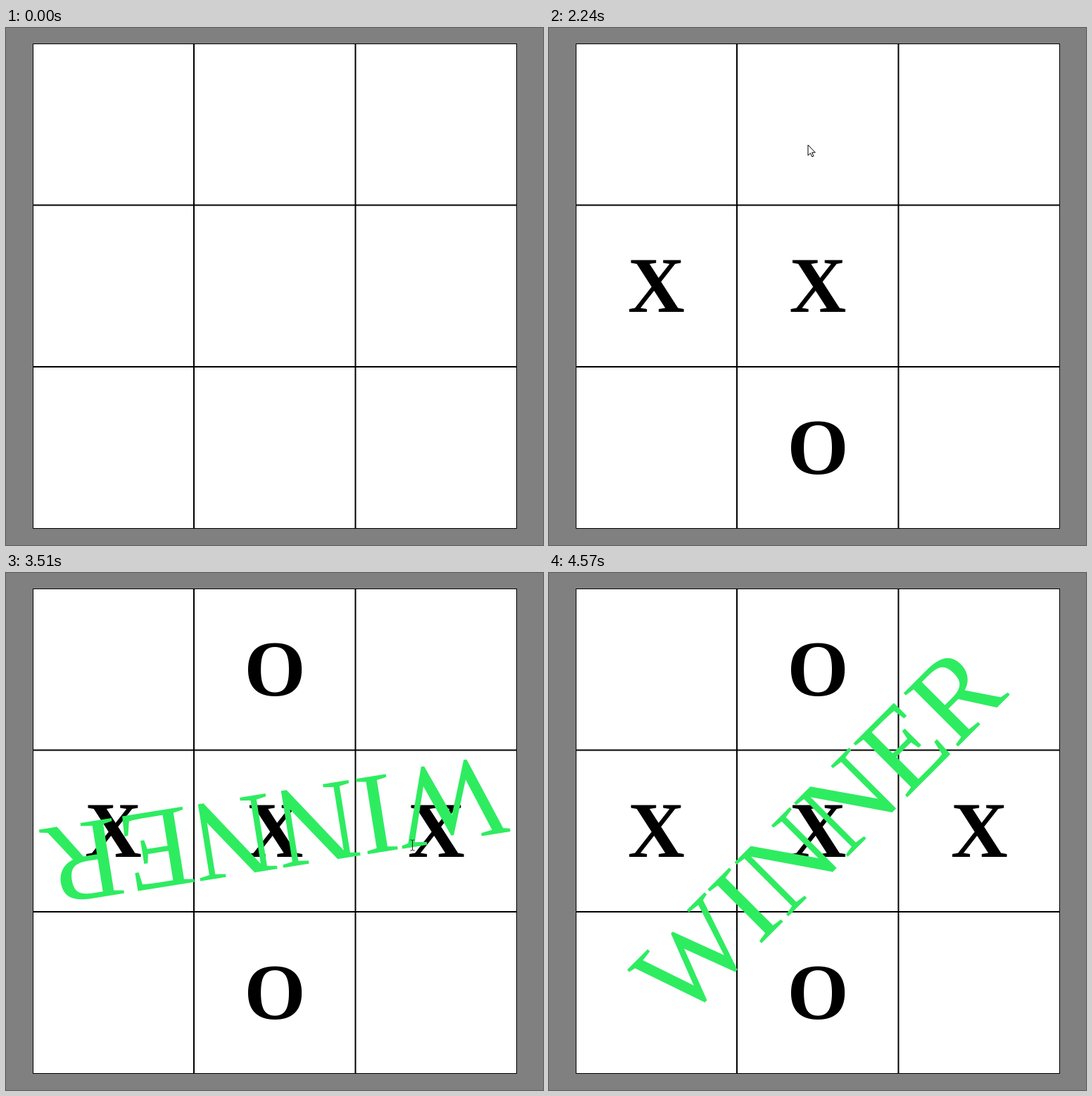
Recreate the animation shown at these times as an HTML page. Size 763 by 734 pixels, loop 5.05 s.

```html
<!DOCTYPE html>
<html lang="en">
<head>
<meta charset="utf-8">
<title>Tic-tac-toe</title>
<style>
  html, body { margin: 0; width: 100%; height: 100%; overflow: hidden; background: #808080; }
  svg { display: block; width: 763px; height: 734px; }
  text { font-family: "Liberation Serif", "Times New Roman", serif; text-anchor: middle; }
  .mark { font-size: 112px; font-weight: bold; }
  #winner { font-size: 165.4px; fill: #2eec60; }
  #halo { fill: #ffff80; mix-blend-mode: multiply; }
</style>
</head>
<body>
<svg viewBox="0 0 763 734">
  <rect width="763" height="734" fill="#808080"/>
  <rect x="38" y="22" width="688" height="688.5" fill="#fff"/>
  <path d="M267 22V710.5M496.5 22V710.5M38 251.5H726M38 481H726" stroke="#000" stroke-width="2"/>
  <rect x="38.5" y="22.5" width="687" height="688" fill="none" stroke="#000"/>
  <g id="marks"></g>
  <text id="winner" y="55.5">WINNER</text>
  <path id="arrow" d="M.5 .5V15.5L4 12.2 6.3 17.3 8.5 16.4 6.2 11.3H10.8Z" fill="#fff" stroke="#000"/>
  <path id="beam" d="M-3 -7.5H-1L0 -6.5 1 -7.5H3M0 -6.5V6.5M-3 7.5H-1L0 6.5 1 7.5H3" fill="none" stroke="#222"/>
  <circle id="halo" r="14"/>
</svg>
<script>
const LOOP = 5050;
const byId = id => document.getElementById(id);
const [winner, arrow, beam, halo] = ['winner', 'arrow', 'beam', 'halo'].map(byId);
const show = (el, on) => el.setAttribute('visibility', on ? 'visible' : 'hidden');
const place = (el, x, y, extra = '') => el.setAttribute('transform', `translate(${x} ${y}) ${extra}`);

// letter, column, row, time of press, time of appearance
const moves = [
  ['X', 0, 1, 500, 590],
  ['O', 1, 2, 1110, 1160],
  ['X', 1, 1, 1700, 1760],
  ['O', 1, 0, 2300, 2370],
  ['X', 2, 1, 3170, 3270],
].map(([letter, col, row, press, at]) => {
  const el = document.createElementNS('http://www.w3.org/2000/svg', 'text');
  const x = 152.5 + 229.5 * col, y = 173.5 + 229.7 * row;
  el.textContent = letter;
  el.setAttribute('class', 'mark');
  place(el, x, y);
  byId('marks').append(el);
  return { el, x, y, press, at };
});

// start, end, target x, target y, sideways bend
const trips = [
  [120, 500, 199.5, 408, 0],
  [650, 1050, 366, 574, 0],
  [1200, 1690, 378, 412, 0],
  [1780, 2210, 368, 166, 75],
  [2400, 3140, 576, 386, 0],
  [4360, 4660, 800, 726, 0],
];

function pointer(t) {
  let x = 650, y = 738;
  for (const [start, end, tx, ty, bend] of trips) {
    if (t < start) break;
    const u = Math.min(1, (t - start) / (end - start));
    const k = 1 - (1 - u) ** 2;
    x += (tx - x) * k + bend * Math.sin(Math.PI * k);
    y += (ty - y) * k;
  }
  return [Math.round(x), Math.round(y)];
}

// Fast clockwise spin that slows into the diagonal
function spin(t) {
  if (t < 3330) return 0;
  if (t < 3380) return 35;
  const step = Math.floor((t - 3380) / 31) * 31;
  return 675 - 423.3 * Math.max(0, 1 - step / 370) ** 2.64;
}

function draw(t) {
  for (const m of moves) show(m.el, t >= m.at);

  show(winner, t >= 3300);
  place(winner, 382, 367, `rotate(${spin(t)})`);

  const [x, y] = pointer(t);
  const visible = t >= 130 && t < 4570;
  const overText = moves.some(m => t >= m.at && Math.abs(x - m.x) < 40 && y > m.y - 100 && y < m.y + 25);
  show(arrow, visible && !overText);
  show(beam, visible && overText);
  place(arrow, x - 0.5, y - 0.5);
  place(beam, x + 1.5, y + 0.5);

  show(halo, moves.some(m => t >= m.press && t < m.at + 20));
  place(halo, x, y);
}

const began = performance.now();
function frame() {
  draw((performance.now() - began) % LOOP);
  requestAnimationFrame(frame);
}
frame();
</script>
</body>
</html>
```
